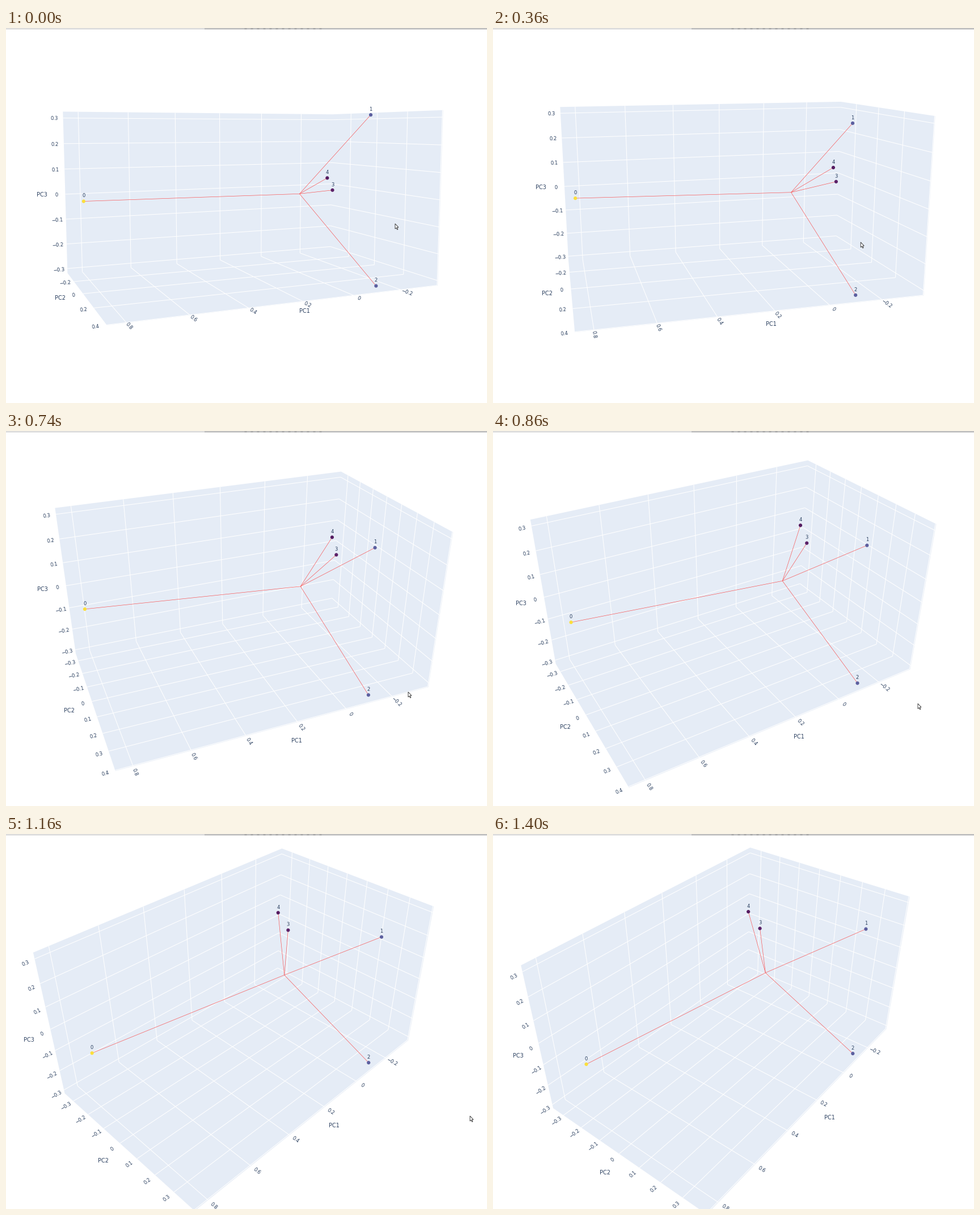
These frames come from a looping animation (848x661 px, 1420 ms). A matplotlib script:

```python
import numpy as np
import matplotlib.pyplot as plt
from matplotlib.animation import FuncAnimation
from matplotlib.collections import LineCollection
from matplotlib.patches import Polygon

W, H, DPI = 848, 661, 64
PT = 72 / DPI                      # points per pixel
TICK_MS, LOOP_MS = 10, 1420

plt.rcParams["font.family"] = "DejaVu Sans"
INK, PANE, RED = "#2a3f5f", "#e5ecf6", "#f85050"

# Data: five vectors from the origin in the space of three components
POINTS = np.array([
    [0.8227, -0.1527, -0.0089],
    [-0.0704, 0.3800, 0.3060],
    [-0.1065, 0.3810, -0.2996],
    [-0.3058, -0.2531, -0.0184],
    [-0.3280, -0.3374, 0.0302],
])
COLORS = ["#fbdf3c", "#5c5f9f", "#5c5f9f", "#5b2168", "#551b60"]

# The box is the data range, padded on each side
LOW, HIGH = POINTS.min(axis=0), POINTS.max(axis=0)
PAD = (HIGH - LOW) / 32
LOW, HIGH = LOW - PAD, HIGH + PAD
CENTER = (LOW + HIGH) / 2

# Camera: pixels per data unit, distance in pixels, screen centre
SCALE, DISTANCE = 463, 1150
SCREEN = np.array([421.2, 296.3])

# Drag path: step, azimuth, elevation, pointer x, pointer y
POSES = np.array([
    [0, 66.4, 5.9, 686, 345],
    [4, 73.25, 10.5, 654, 369],
    [9, 77.3, 19.5, 648, 421],
    [12, 67.65, 27.75, 709, 460],
    [14, 59.5, 31.5, 749, 480.5],
    [19, 45.0, 36.1, 818, 497],
    [23, 38.4, 35.95, 851, 500],
])
KEYS, VALUES = POSES[:, 0], POSES[:, 1:]
SLOPES = np.gradient(VALUES, KEYS, axis=0)

# Each axis: name, outward axis of its labels,
# then (base, gain) of the tick label and title offsets
AXES = [("PC1", 1, (1.8, 12), (9, 30.5)),
        ("PC2", 0, (3.8, 12), (42.5, 0)),
        ("PC3", 0, (3.8, 12), (41.5, 0))]
POINTER = np.array([[0, 0], [0, 9], [2, 7.2], [3.6, 10.4],
                    [4.9, 9.8], [3.4, 6.6], [6, 6.4]])


def step_at(t):
    """Screen updates come every 60 ms, two of them 10 ms late."""
    return (t - 10 * (t >= 360) - 10 * (t >= 670)) // 60


def pose_at(step):
    """Cubic Hermite curve through the key poses."""
    i = min(np.searchsorted(KEYS, step, "right") - 1, len(KEYS) - 2)
    span = KEYS[i + 1] - KEYS[i]
    u = (step - KEYS[i]) / span
    return ((1 + 2 * u) * (1 - u) ** 2 * VALUES[i]
            + u * (1 - u) ** 2 * span * SLOPES[i]
            + u * u * (3 - 2 * u) * VALUES[i + 1]
            + u * u * (u - 1) * span * SLOPES[i + 1])


def make_camera(azimuth, elevation):
    """Turntable perspective; returns a data-to-pixel function."""
    a, e = np.radians([azimuth, elevation])
    basis = np.array([
        [-np.sin(a), np.cos(a), 0],
        [np.sin(e) * np.cos(a), np.sin(e) * np.sin(a), -np.cos(e)],
        [np.cos(e) * np.cos(a), np.cos(e) * np.sin(a), np.sin(e)],
    ])

    def project(p):
        v = (np.asarray(p) - CENTER) * SCALE @ basis.T
        return SCREEN + v[..., :2] * DISTANCE / (DISTANCE - v[..., 2:])

    return project


def corner(sides):
    """Box corner from a string such as '+-+' (high, low, high)."""
    return [HIGH[i] if s == "+" else LOW[i] for i, s in enumerate(sides)]


OUTLINE = [corner(s) for s in ("+-+", "--+", "-++", "-+-", "++-", "+--")]


def tick_values(axis, step):
    first, last = np.ceil(LOW[axis] / step), np.floor(HIGH[axis] / step)
    return np.arange(first, last + 1) * step


def grid_lines(axis, values):
    """Lines of constant value on the two walls that hold the axis."""
    others = [i for i in range(3) if i != axis]
    for v in values:
        for along in others:
            line = np.array([LOW, LOW])
            line[:, axis] = v
            line[1, along] = HIGH[along]
            yield line


def label_spot(project, axis, value, base, gain):
    """Place beside the box edge, along the grid line, and its direction."""
    side = AXES[axis][1]
    edge = LOW.copy()
    edge[side] = HIGH[side]
    edge[axis] = value
    ahead = edge.copy()
    ahead[side] += 0.01
    here = project(edge)
    d = (project(ahead) - here) / (0.01 * SCALE)
    size = np.hypot(*d)
    return here + d / size * (base + gain * size), d


def tick_text(v):
    return f"{round(v, 1) + 0:g}".replace("-", "\u2212")


fig = plt.figure(figsize=(W / DPI, H / DPI), dpi=DPI, facecolor="white")
ax = fig.add_axes([0, 0, 1, 1])
ax.set(xlim=(0, W), ylim=(H, 0))
ax.axis("off")

# Window border along the top
for x0, x1, color, style in [(0, W, "#b0b0b0", "-"), (350, W, "#6f6f6f", "-"),
                             (420, 556, "#404040", (0, (4, 7)))]:
    ax.plot([x0, x1], [0.5, 0.5], color=color, lw=PT, ls=style)

pane = ax.add_patch(Polygon(np.zeros((6, 2)), fc=PANE, ec="none", zorder=1))
grid = ax.add_collection(LineCollection([], colors="white",
                                        linewidths=1.05 * PT, zorder=2))
rays = ax.add_collection(LineCollection([], colors=RED,
                                        linewidths=0.65 * PT, zorder=4))
dots = ax.scatter(np.zeros(5), np.zeros(5), s=(6.2 * PT) ** 2, c=COLORS,
                  linewidths=0, zorder=5)
pointer = ax.add_patch(Polygon(POINTER, fc="white", ec="#333333",
                               lw=0.9 * PT, zorder=8))


def make_text(size, text=""):
    return ax.text(0, 0, text, size=size * PT, color=INK, ha="center",
                   va="center_baseline", rotation_mode="anchor", zorder=6)


tick_pool = [make_text(8.5) for _ in range(26)]
titles = [make_text(9.8, spec[0]) for spec in AXES]
names = [make_text(8.5, str(i)) for i in range(len(POINTS))]


def draw(frame):
    azimuth, elevation, px, py = pose_at(step_at(frame * TICK_MS))
    project = make_camera(azimuth, elevation)
    pane.set_xy(project(OUTLINE))

    # The second axis gets finer ticks once it is long enough on screen
    near, far = project([corner("++-"), corner("+--")])
    fine = np.hypot(*(near - far)) > 190
    steps = [0.2, 0.1 if fine else 0.2, 0.1]

    lines, used = [], 0
    for axis, (_, _, tick_gap, title_gap) in enumerate(AXES):
        values = tick_values(axis, steps[axis])
        lines += [project(line) for line in grid_lines(axis, values)]
        for v in values:
            spot, d = label_spot(project, axis, v, *tick_gap)
            label = tick_pool[used]
            used += 1
            label.set_text(tick_text(v))
            label.set_position(spot)
            dx, dy = d if d[0] > 0 else -d
            label.set_rotation(-np.degrees(np.arctan2(dy, dx)))
        spot, _ = label_spot(project, axis, CENTER[axis], *title_gap)
        titles[axis].set_position(spot)
    for i, label in enumerate(tick_pool):
        label.set_visible(i < used)
    grid.set_segments(lines)

    origin, spots = project(np.zeros(3)), project(POINTS)
    rays.set_segments([[origin, s] for s in spots])
    dots.set_offsets(spots)
    for name, spot in zip(names, spots):
        name.set_position(spot - [0, 10.7])
    pointer.set_xy(POINTER + [px, py])
    return []


anim = FuncAnimation(fig, draw, frames=LOOP_MS // TICK_MS, interval=TICK_MS,
                     init_func=lambda: draw(0), repeat=True, repeat_delay=0)
plt.show()
```
